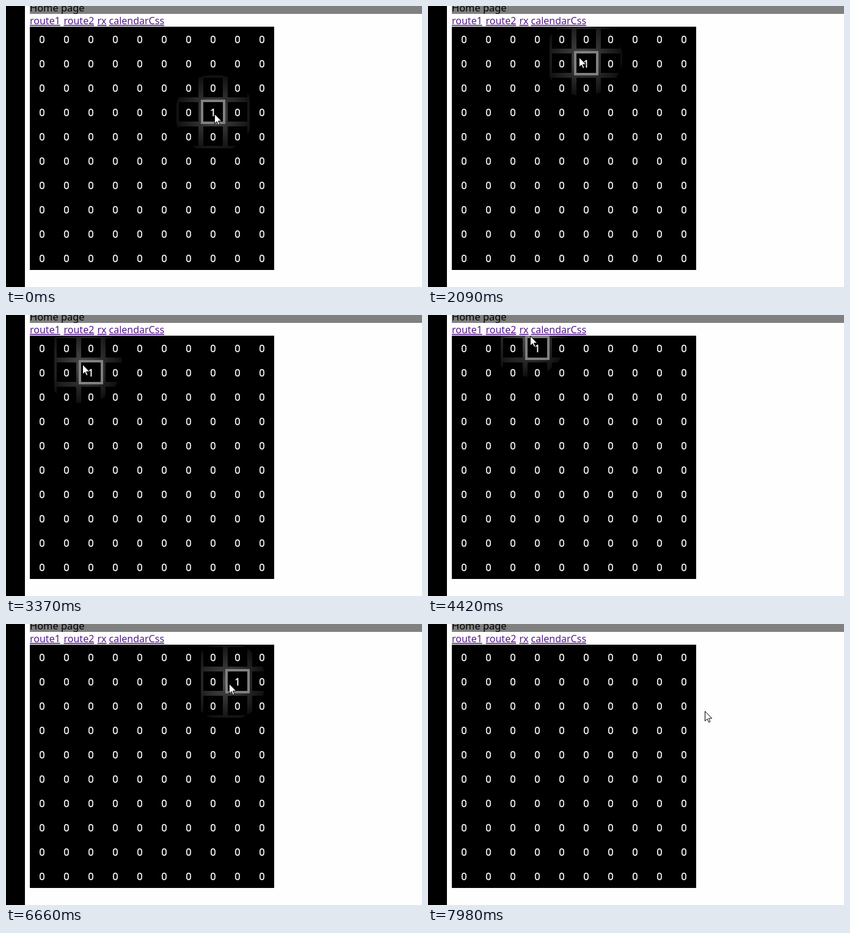
Animation, 681 px wide and 462 px high, one loop 8000 ms. Source, as an HTML page:

```html
<!DOCTYPE html>
<html lang="en">
<head>
<meta charset="utf-8">
<title>Grid hover glow</title>
<style>
  html, body { margin: 0; width: 100%; height: 100%; overflow: hidden; background: #fefefe; }
  svg { display: block; width: 681px; height: 462px; font: 16px "Noto Sans", "Open Sans", sans-serif; }
  .links { fill: #551a8b; text-decoration: underline 1px; text-underline-offset: 1px; }
  .digits { fill: #fff; stroke: #fff; stroke-width: .35px; font-size: 16.5px; text-anchor: middle; }
</style>
</head>
<body>
<svg viewBox="0 0 681 462">
  <defs>
    <radialGradient id="light" gradientUnits="userSpaceOnUse" r="65">
      <stop offset="0" stop-color="#4c4c4c"/>
      <stop offset=".97" stop-color="#101010"/>
      <stop offset="1" stop-color="#000"/>
    </radialGradient>
  </defs>
  <rect width="681" height="462" fill="#fefefe"/>
  <rect width="31" height="462"/>
  <rect x="39" width="642" height="13" fill="#808080"/>
  <text x="39" y="9" font-size="16.4">Home page</text>
  <g class="links">
    <text x="39" y="30">route1</text>
    <text x="94.5" y="30">route2</text>
    <text x="149.5" y="30">rx</text>
    <text x="168.5" y="30">calendarCss</text>
  </g>
  <rect x="39" y="34" width="400" height="400"/>
  <path id="glow" fill="url(#light)" fill-rule="evenodd"/>
  <rect id="hover" width="36" height="36" fill="none" stroke="#808080" stroke-width="4"/>
  <g id="digits" class="digits"></g>
  <path id="cursor" d="M.5 .5V16.5L4.2 13L6.6 18.6L9 17.6L6.6 12.1H11.7Z" fill="#fff" stroke="#000"/>
</svg>
<script>
const LOOP = 8000, STEP = 133, LEAD = 45;  // ms; the picture moves in steps
const LAG = 0.5;                           // steps the light trails the pointer
const LEFT = 39, TOP = 34, CELL = 40, COUNT = 10;

// Pointer turns: step, x, y
const path = [
  [0, 341, 177], [9, 333, 107], [16, 247, 84], [25, 125, 81], [33, 167, 34],
  [39, 304, 9], [44, 325, 59], [50, 365, 98], [60, 453, 143]
];

const byId = id => document.getElementById(id);
const light = byId("light"), glow = byId("glow"), hover = byId("hover"), cursor = byId("cursor");
const inside = n => n >= 0 && n < COUNT;

const digits = Array.from({ length: COUNT * COUNT }, (_, i) => {
  const text = document.createElementNS("http://www.w3.org/2000/svg", "text");
  text.setAttribute("x", LEFT + CELL * (i % COUNT + 0.5));
  text.setAttribute("y", TOP + CELL * Math.floor(i / COUNT) + 27);
  text.textContent = "0";
  return byId("digits").appendChild(text);
});

function slope(i, axis) {
  const a = path[i], b = path[i + 1];
  return a && b ? (b[axis] - a[axis]) / (b[0] - a[0]) : 0;
}

// Harmonic mean of both sides, so the curve never overshoots a turn
function tangent(i, axis) {
  const before = slope(i - 1, axis), after = slope(i, axis);
  return before * after > 0 ? 2 * before * after / (before + after) : 0;
}

function pointerAt(step) {
  const s = Math.max(0, step);
  const i = Math.max(0, path.findIndex(p => p[0] >= s) - 1);
  const a = path[i], b = path[i + 1], span = b[0] - a[0], u = (s - a[0]) / span;
  return [1, 2].map(axis => Math.round(
    a[axis] + (b[axis] - a[axis]) * u * u * (3 - 2 * u)
    + span * u * (1 - u) * ((1 - u) * tangent(i, axis) - u * tangent(i + 1, axis))));
}

function cellFrame(col, row) {
  const x = LEFT + CELL * col, y = TOP + CELL * row;
  return `M${x} ${y}h40v40h-40zM${x + 4} ${y + 4}h32v32h-32z`;
}

function neighbourFrames(col, row) {
  let d = "";
  for (let r = row - 1; r <= row + 1; r++)
    for (let c = col - 1; c <= col + 1; c++)
      if (inside(r) && inside(c)) d += cellFrame(c, r);
  return d;
}

let active = null;

function draw(step) {
  const [x, y] = pointerAt(step), [lightX, lightY] = pointerAt(step - LAG);
  const col = Math.floor((x - LEFT) / CELL), row = Math.floor((y - TOP) / CELL);
  const over = inside(col) && inside(row);

  cursor.setAttribute("transform", `translate(${x} ${y})`);
  light.setAttribute("cx", lightX);
  light.setAttribute("cy", lightY);
  glow.setAttribute("d", over ? neighbourFrames(col, row) : "");
  hover.setAttribute("visibility", over ? "visible" : "hidden");
  hover.setAttribute("x", LEFT + CELL * col + 2);
  hover.setAttribute("y", TOP + CELL * row + 2);

  if (active) active.textContent = "0";
  active = over ? digits[row * COUNT + col] : null;
  if (active) active.textContent = "1";
}

let shown = -1;

function tick() {
  const step = Math.floor((performance.now() % LOOP + LEAD) / STEP);
  if (step !== shown) draw(shown = step);
  requestAnimationFrame(tick);
}
tick();
</script>
</body>
</html>
```
